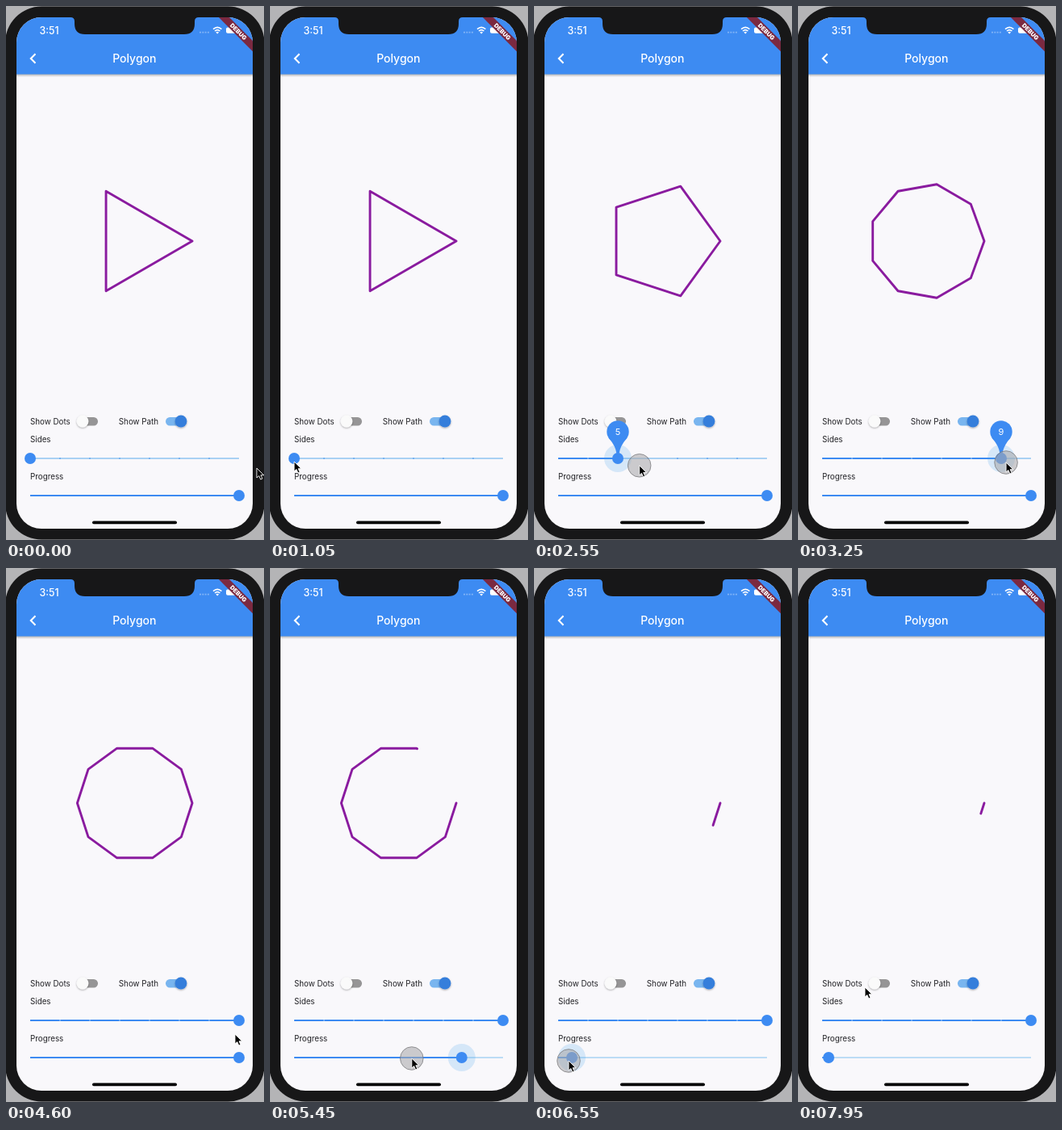
Animation, 320 px wide and 661 px high, one loop 8000 ms. Source, as an HTML page:

```html
<!DOCTYPE html>
<html lang="en">
<head>
<meta charset="utf-8">
<title>Polygon</title>
<style>
  html, body { margin: 0; width: 100%; height: 100%; overflow: hidden; background: #b4b4b6; }
  svg { display: block; width: 100vw; height: 100vh; }
  text { font-family: Inter, Roboto, sans-serif; }
  .label { font-size: 9.8px; fill: #222226; }
  .blue { fill: #3d8bf2; }
  .halo { fill: #3d9be9; fill-opacity: .19; }
  .active { stroke: #3d8bf2; stroke-width: 1.8; }
  .inactive { stroke: #bcdcf5; stroke-width: 1.8; }
</style>
</head>
<body>
<svg viewBox="0 0 320 661" preserveAspectRatio="none">
  <defs>
    <clipPath id="screen"><rect x="13" y="14" width="293" height="633" rx="31"/></clipPath>
    <linearGradient id="barShadow" x2="0" y2="1">
      <stop stop-color="#000" stop-opacity=".3"/>
      <stop offset="1" stop-color="#000" stop-opacity="0"/>
    </linearGradient>
    <filter id="soft" x="-50%" y="-50%" width="200%" height="200%">
      <feDropShadow dx="0" dy="1" stdDeviation="1" flood-opacity=".35"/>
    </filter>
  </defs>

  <!-- Phone body and screen -->
  <rect x="-1" y=".5" width="321.5" height="660" rx="45" fill="#171718"/>
  <g clip-path="url(#screen)">
    <rect x="13" y="14" width="293" height="633" fill="#f9f8fb"/>
    <rect x="13" y="84" width="293" height="4" fill="url(#barShadow)"/>
    <rect x="13" y="14" width="293" height="70.5" class="blue"/>
    <path d="M80 14q5 0 5 5v3q0 13 13 13h123q13 0 13-13v-3q0-5 5-5z" fill="#171718"/>
    <g fill="#fff">
      <text x="53.5" y="34.5" font-size="12.4" font-weight="500" text-anchor="middle">3:51</text>
      <text x="159.3" y="70" font-size="14" font-weight="500" text-anchor="middle">Polygon</text>
      <path d="M36.5 59.2L30.8 65l5.7 5.8" fill="none" stroke="#fff" stroke-width="2.1"/>
      <path d="M240 32.7h12" stroke="#fff" stroke-opacity=".35" stroke-width="1.8" stroke-dasharray="2 1.3"/>
      <g fill="none" stroke="#fff" stroke-width="1.6">
        <path d="M257 28.7q5.2-4.6 10.4 0M259 31q3.2-2.8 6.4 0"/>
      </g>
      <path d="M260.3 32.4q1.9-1.5 3.8 0l-1.9 2z"/>
      <rect x="273" y="26.5" width="15" height="7.3" rx="2"/>
    </g>
    <g transform="translate(306 14) rotate(45)">
      <rect x="-40" y="20.5" width="80" height="9.3" fill="#7b2940"/>
      <text y="27.7" font-size="7.4" font-weight="900" fill="#fff" text-anchor="middle">DEBUG</text>
    </g>
  </g>
  <rect x="107" y="637.6" width="105" height="3.6" rx="1.8" fill="#000"/>

  <path id="polygon" pathLength="1" fill="none" stroke="#8a1b9f" stroke-width="2.9" stroke-linecap="round" stroke-linejoin="round"/>

  <!-- Controls -->
  <text x="30" y="517.5" class="label">Show Dots</text>
  <text x="139.8" y="517.5" class="label">Show Path</text>
  <text x="30" y="540.4" class="label">Sides</text>
  <text x="30" y="586.4" class="label">Progress</text>
  <rect x="89" y="509" width="25" height="10.4" rx="5.2" fill="#969596"/>
  <circle cx="95" cy="514" r="7.4" fill="#fafafa" filter="url(#soft)"/>
  <rect x="198" y="509" width="25" height="10.4" rx="5.2" fill="#79b5ef"/>
  <circle cx="217" cy="514" r="7.4" fill="#347edb" filter="url(#soft)"/>
  <g id="sides"></g>
  <g id="progress"></g>
  <g id="bubble">
    <circle cy="-33" r="13.7" class="blue"/>
    <path d="M-11.5-25.5Q-2.5-15-1.6-6L0 0 1.6-6Q2.5-15 11.5-25.5z" class="blue"/>
    <text id="count" y="-29" font-size="11" fill="#fff" text-anchor="middle"></text>
  </g>

  <!-- Pointer -->
  <circle id="touch" r="14.3" fill="#a9a9ac" fill-opacity=".58" stroke="#77777a" stroke-opacity=".75" stroke-width="1"/>
  <path id="cursor" d="M0 0v12l2.8-2.5 2 4.5 2.2-1-2-4.3h3.8z" fill="#000" stroke="#fff" stroke-width=".9"/>
</svg>
<script>
const LOOP = 8000, LEFT = 30, WIDTH = 259, STEPS = 7, RADIUS = 71.3;
const sidesPress = [1250, 4150], progressPress = [5000, 7700];

// Pointer path: time, x, y
const pointerPath = [
  [0, 311, 572], [300, 303, 579], [1050, 30, 564], [1250, 30, 563], [1800, 60, 565],
  [2150, 73, 566], [2500, 120, 569], [3000, 225, 567], [3250, 258, 565], [3450, 272, 565],
  [3700, 289, 564], [4150, 289, 563], [4600, 284, 577], [4850, 288, 604], [5000, 289, 607],
  [5200, 238, 607], [5450, 176, 607], [5950, 75, 609], [6300, 47, 610], [6550, 43, 610],
  [7000, 38, 609], [7700, 38, 607], [7950, 83, 519], [8000, 83, 519]
];

const $ = id => document.getElementById(id);
const clamp = (v, lo = 0, hi = 1) => Math.min(hi, Math.max(lo, v));
const set = (el, attrs) => { for (const k in attrs) el.setAttribute(k, attrs[k]); };
const place = (id, x, y, scale = 1) => set($(id), { transform: `translate(${x} ${y}) scale(${scale})` });

function pointer(t) {
  const i = Math.max(1, pointerPath.findIndex(p => p[0] >= t));
  const [t0, x0, y0] = pointerPath[i - 1], [t1, x1, y1] = pointerPath[i];
  const k = clamp((t - t0) / (t1 - t0));
  return [x0 + (x1 - x0) * k, y0 + (y1 - y0) * k];
}

const isDown = (t, [from, to]) => t >= from && t < to;
const pressAmount = (t, [from, to]) => clamp(Math.min((t - from) / 100, (to + 100 - t) / 100));

// Slider fraction under the pointer while it is held
function dragged(t, [from, to], lag) {
  return clamp((pointer(clamp(t - lag, from, to))[0] - LEFT) / WIDTH);
}

function makeSlider(id, y, ticks) {
  let tickMarks = '';
  for (let i = 1; i < ticks; i++)
    tickMarks += `<circle class="tick" cx="${LEFT + WIDTH * i / ticks}" cy="${y}" r=".8"/>`;
  $(id).innerHTML = `
    <path class="inactive" d="M${LEFT} ${y}h${WIDTH}"${ticks ? ' style="stroke:#8fc4f1;stroke-width:1.3"' : ''}/>
    <path class="active"/>${tickMarks}
    <circle class="halo" cy="${y}"/><circle class="blue" cy="${y}" r="7"/>`;
  const find = s => $(id).querySelector(s);
  const active = find('.active'), halo = find('.halo'), thumb = find('.blue');
  const marks = [...$(id).querySelectorAll('.tick')];
  return (value, press) => {
    const x = LEFT + WIDTH * value;
    set(active, { d: `M${LEFT} ${y}H${x}` });
    set(halo, { cx: x, r: 17 * press });
    set(thumb, { cx: x });
    marks.forEach((m, i) => set(m, { fill: (i + 1) / ticks < value ? '#b5d8f8' : '#3d8bf2' }));
    return x;
  };
}

const drawSides = makeSlider('sides', 560, STEPS);
const drawProgress = makeSlider('progress', 606, 0);

const sideStep = t => Math.round(dragged(t, sidesPress, 60) * STEPS);

// The thumb glides to each new step over a short window
function sidesThumb(t) {
  let sum = 0;
  for (let i = 0; i < 10; i++) sum += sideStep(t - i * 8);
  return sum / 10 / STEPS;
}

function polygonPath(n) {
  const points = Array.from({ length: n }, (_, i) => {
    const a = 2 * Math.PI * i / n;
    return `${159.7 + RADIUS * Math.cos(a)} ${291 + RADIUS * Math.sin(a)}`;
  });
  return `M${points.join('L')}Z`;
}

function draw(t) {
  const sides = 3 + sideStep(t);
  const progress = t < progressPress[0] ? 1 : dragged(t, progressPress, 250);
  set($('polygon'), {
    d: polygonPath(sides),
    'stroke-dasharray': progress < 1 ? `${progress} 2` : 'none'
  });

  const press = pressAmount(t, sidesPress);
  const thumbX = drawSides(sidesThumb(t), press);
  drawProgress(progress, pressAmount(t, progressPress));
  place('bubble', thumbX, 560, press);
  $('count').textContent = sides;

  const [x, y] = pointer(t);
  const held = isDown(t, sidesPress) || isDown(t, progressPress);
  place('touch', x, y);
  place('cursor', x, y);
  set($('touch'), { visibility: held ? 'visible' : 'hidden' });
}

function frame() {
  draw(performance.now() % LOOP);
  requestAnimationFrame(frame);
}
frame();
</script>
</body>
</html>
```
